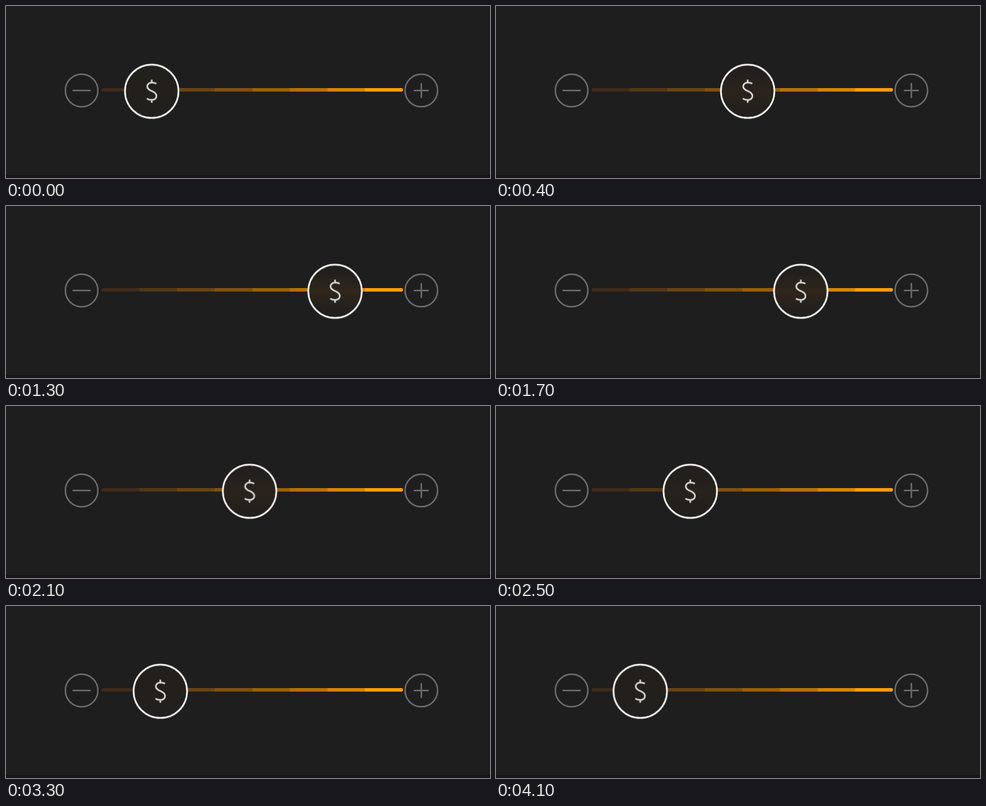
These frames come from a looping animation (800x285 px, 4.2 s). An HTML page without scripts:

```html
<!DOCTYPE html>
<html lang="en">
<head>
<meta charset="utf-8">
<title>Price slider</title>
<style>
  html, body { margin: 0; width: 100%; height: 100%; overflow: hidden; background: #1e1e1e; }
  svg { display: block; width: 800px; height: 285px; }
  .button { fill: none; stroke: #6c6c6c; stroke-width: 2.5; }
  .knob, .glow { animation: 4.2s -77.5ms infinite; }
  .knob { animation-name: slide; }
  .glow { animation-name: warm; }
  .sign { fill: none; stroke: #dcdcdb; stroke-width: 2.7; }

  /* quick push to the right, slow settle back */
  @keyframes slide {
    0% { transform: translate(238.3px, 141.3px); animation-timing-function: cubic-bezier(.491, 0, .283, 1); }
    25.655% { transform: translate(549.8px, 141.3px); animation-timing-function: cubic-bezier(.439, 0, .183, .967); }
    100% { transform: translate(238.3px, 141.3px); }
  }
  @keyframes warm {
    0% { opacity: .12; animation-timing-function: cubic-bezier(.491, 0, .283, 1); }
    25.655% { opacity: 1; animation-timing-function: cubic-bezier(.439, 0, .183, .967); }
    100% { opacity: .12; }
  }
</style>
</head>
<body>
<svg viewBox="0 0 800 285">
  <defs>
    <clipPath id="rail"><rect x="158" y="136" width="498" height="5.6" rx="2.8"/></clipPath>
    <linearGradient id="heat" x2="0" y2="1">
      <stop offset=".1" stop-color="#ff9a10" stop-opacity="0"/>
      <stop offset=".5" stop-color="#ff9a10" stop-opacity=".07"/>
      <stop offset=".9" stop-color="#ff9a10" stop-opacity="0"/>
    </linearGradient>
  </defs>

  <rect width="800" height="285" fill="#1e1e1e"/>
  <rect y="280" width="800" height="5" fill="#1a1517"/>

  <g clip-path="url(#rail)">
    <rect x="158" y="135" width="498" height="8" fill="#3e2b18"/>
    <rect x="220.5" y="135" width="436" height="8" fill="#553714"/>
    <rect x="282.7" y="135" width="374" height="8" fill="#6b4412"/>
    <rect x="345" y="135" width="312" height="8" fill="#80500f"/>
    <rect x="407.3" y="135" width="249" height="8" fill="#9c6008"/>
    <rect x="469.5" y="135" width="187" height="8" fill="#b87008"/>
    <rect x="531.7" y="135" width="125" height="8" fill="#da8306"/>
    <rect x="593.5" y="135" width="63" height="8" fill="#fd9c0a"/>
  </g>

  <g class="button">
    <circle cx="125" cy="140" r="26.9"/>
    <path d="M110 140H140"/>
    <circle cx="686.5" cy="140" r="26.9"/>
    <path d="M674 140H699M686.5 127.5V152.5"/>
  </g>

  <g class="knob">
    <circle r="44.2" fill="#22201d"/>
    <circle class="glow" r="44.2" fill="url(#heat)"/>
    <circle r="44.2" fill="none" stroke="#fff" stroke-width="2.7"/>
    <path class="sign" d="M7.7-12.8C5-14 2.6-14.4 0-14.4C-4.5-14.4-7.4-11.7-7.4-8.1C-7.4-4.1-4-2.2 0-.4C5 1.6 7.8 4 7.8 7.8C7.8 12 4.5 14.3 0 14.3C-3 14.3-5.8 13.7-8.1 12.2M0-19.3V-14M0 14V19"/>
  </g>
</svg>
</body>
</html>
```
